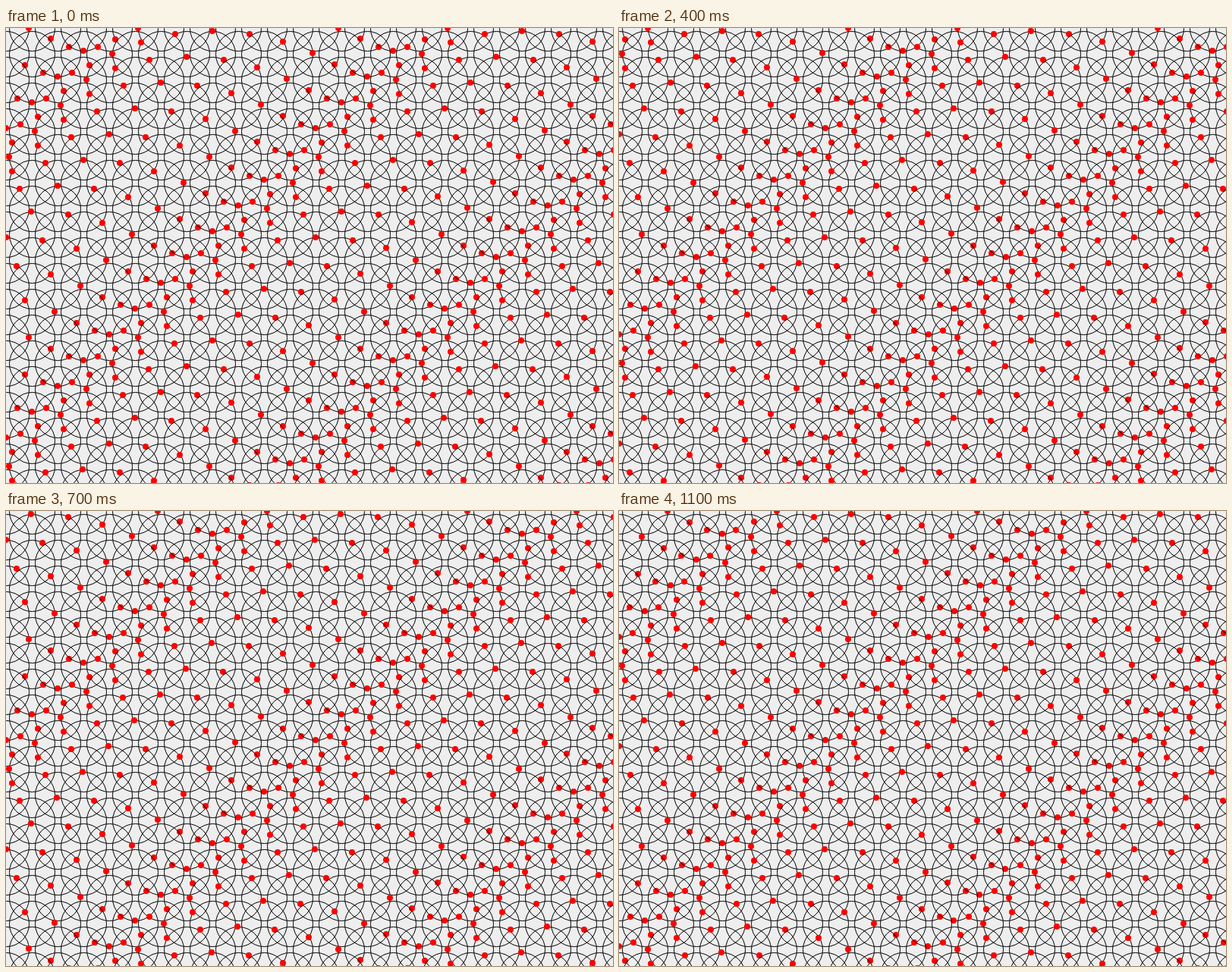
Recreate the animation shown at these times as an HTML page with a canvas. Size 800 by 600 pixels, loop 1.2 s.

```html
<!DOCTYPE html>
<html lang="en">
<head>
<meta charset="utf-8">
<title>Orbiting dots</title>
<style>
html, body { margin: 0; width: 100%; height: 100%; overflow: hidden; background: #eee; }
canvas { display: block; }
</style>
</head>
<body>
<canvas id="stage" width="800" height="600"></canvas>
<script>
const ctx = document.getElementById('stage').getContext('2d');
const GAP = 34, RADIUS = 30, DOT = 4;
const COLS = 25, ROWS = 19;
const STEPS = 12, STEP_MS = 100;
const TURN = Math.PI / 6;

// Angles are summed step by step, since dots snap to whole pixels.
const angles = [0];
while (angles.length < STEPS) angles.push(angles[angles.length - 1] + TURN);

function circle(x, y, r) {
  ctx.beginPath();
  ctx.arc(x, y, r, 0, 2 * Math.PI);
}

function tile(col, row, base) {
  const x = col * GAP, y = row * GAP;
  const angle = base + (col + row) * TURN;
  circle(x + 0.5, y + 0.5, RADIUS);
  ctx.stroke();
  circle(Math.trunc(x + RADIUS * Math.cos(angle)),
         Math.trunc(y + RADIUS * Math.sin(angle)), DOT);
  ctx.fill();
}

function draw(step) {
  ctx.fillStyle = '#eee';
  ctx.fillRect(0, 0, 800, 600);
  ctx.strokeStyle = '#000';
  ctx.lineWidth = 1;
  ctx.fillStyle = '#f00';
  for (let row = 0; row < ROWS; row++) {
    for (let col = 0; col < COLS; col++) tile(col, row, angles[step]);
  }
}

let shown = -1;
const start = performance.now();

function tick() {
  const time = Math.max(0, performance.now() - start);
  const step = Math.floor(time / STEP_MS) % STEPS;
  if (step !== shown) draw(shown = step);
  requestAnimationFrame(tick);
}
tick();
</script>
</body>
</html>
```
